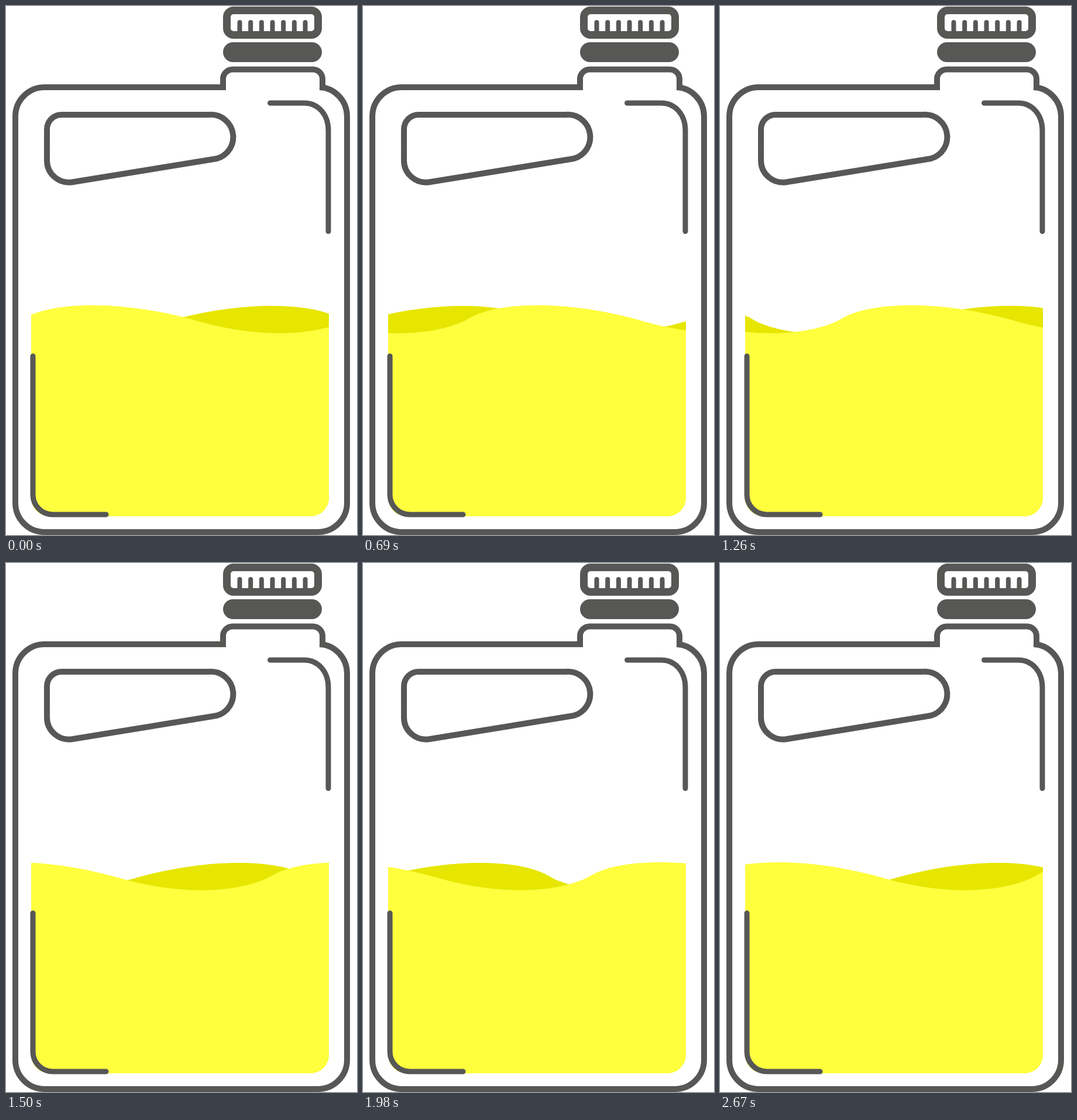
An HTML page for the animation above (2.7 s loop, 600x905 px).

```html
<!DOCTYPE html>
<html lang="en">
<head>
<meta charset="utf-8">
<title>Canister</title>
<style>
  html, body { margin: 0; width: 100%; height: 100%; overflow: hidden; background: #fff; }
  svg { display: block; width: 600px; height: 905px; }
  .line { fill: none; stroke: #575756; stroke-width: 10; }
  .thin { stroke-width: 9; stroke-linecap: round; }
</style>
</head>
<body>
<svg viewBox="0 0 600 905">
  <defs>
    <clipPath id="tank"><path d="M43 480H552V841A32 32 0 0 1 520 873H75A32 32 0 0 1 43 841Z"/></clipPath>
  </defs>
  <g clip-path="url(#tank)">
    <path id="back" fill="#e6e600"/>
    <path id="front" fill="#ffff3e"/>
  </g>

  <!-- body and neck -->
  <path class="line" d="M376 139H66A50 50 0 0 0 16 189V850A50 50 0 0 0 66 900H533A50 50 0 0 0 583 850V189C583 162 562 140 536 139"/>
  <path class="line" d="M371 144V125A16.500 16.500 0 0 1 387.500 108.500H524.500A16.500 16.500 0 0 1 541 125V144"/>

  <!-- handle -->
  <path class="line" d="M95 186H347A38 38 0 0 1 353.200 262.300L113.700 301.200A37.500 37.500 0 0 1 70 264V211A25 25 0 0 1 95 186Z"/>

  <!-- cap -->
  <rect class="line" x="377.500" y="7.500" width="156" height="42" rx="11.500" style="stroke-width:13"/>
  <rect x="371" y="62" width="169" height="34" rx="17" fill="#575756"/>
  <path id="teeth" class="line" style="stroke-width:8;stroke-linecap:round"/>

  <!-- highlights -->
  <path class="line thin" d="M451.500 166H510C534 166 551 186 551 213V385.500"/>
  <path class="line thin" d="M46 599V836A34 34 0 0 0 80 870H171"/>
</svg>
<script>
  const LOOP = 2700, STEP = 30, WAVE = 558;
  const el = id => document.getElementById(id);
  const mod = (a, n) => ((a % n) + n) % n;

  let teeth = '';
  for (let i = 0; i < 7; i++) teeth += `M${399.5 + i * 18.67} 28V44`;
  el('teeth').setAttribute('d', teeth);

  // dir 1: gentle slope faces right; dir -1: the mirrored profile
  function wave(x, y, dir) {
    const c = (...p) => 'c' + p.map((v, i) => i % 2 ? v : v * dir).join(' ');
    const one = c(45, -29, 160, -35, 289, 0) + c(119, 36, 219, 27, 269, 0);
    const start = dir > 0 ? mod(x, WAVE) - WAVE : mod(x, WAVE) + WAVE;
    const end = start + 2 * WAVE * dir;
    return `M${start} ${y}${one}${one}L${end} 905H${start}Z`;
  }

  function draw(t) {
    el('front').setAttribute('d', wave(28 + 1.027 * t, 536, 1));
    el('back').setAttribute('d', wave(574 - 0.41 * t, 537, -1));
  }

  const begin = performance.now();
  function tick() {
    const t = (performance.now() - begin) % LOOP;
    draw(Math.floor(t / STEP) * STEP);
    requestAnimationFrame(tick);
  }
  draw(0);
  requestAnimationFrame(tick);
</script>
</body>
</html>
```
